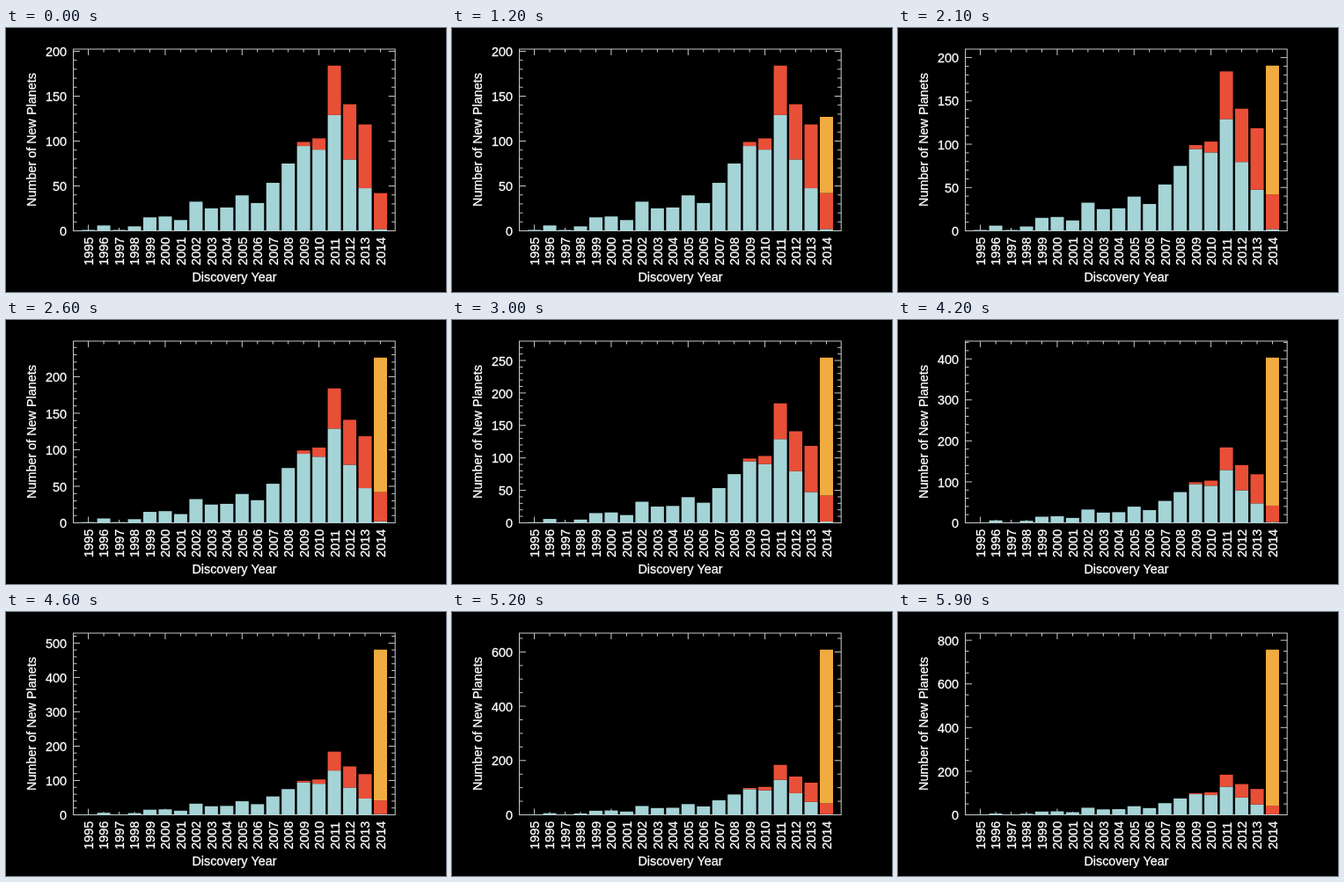
Write an HTML page with a canvas that moves like this. It is 500 px wide and 300 px high and loops after 8400 ms.

```html
<!DOCTYPE html>
<html lang="en">
<head>
<meta charset="utf-8">
<title>New planets per year</title>
<style>
html, body { margin: 0; width: 100%; height: 100%; overflow: hidden; background: #000; }
canvas { display: block; }
</style>
</head>
<body>
<canvas id="chart" width="500" height="300"></canvas>
<script>
const ctx = document.getElementById('chart').getContext('2d');
const LOOP = 8400, STEP = 100, LAST = 59;
const L = 76.5, R = 442.2, T = 24, B = 230.5;
const FIRST_YEAR = 1995, FIRST_X = 93.6, PITCH = 17.47, BAR = 15;
const BLUE = '#a5d4d6', RED = '#e94f37', ORANGE = '#f0ab41', LINE = '#c8c8c8';

const base = [1, 6, 1, 5, 15, 16, 12, 32.5, 25, 26, 39.5, 31, 53.5, 75,
  94.5, 90.5, 129, 79.5, 47.5, 2];
const extra = { 2009: 4.5, 2010: 12.5, 2011: 55, 2012: 61.5, 2013: 71, 2014: 40 };
const PEAK = 184, START = 42, RATE = 7.08;

// The count runs at single, then double, then triple speed.
const added = n => RATE * (n + Math.max(0, n - 33) + Math.max(0, n - 43));

const yearX = i => FIRST_X + i * PITCH;

function line(x1, y1, x2, y2) {
  ctx.beginPath();
  ctx.moveTo(x1, y1);
  ctx.lineTo(x2, y2);
  ctx.stroke();
}

function label(str, x, y, align, turned) {
  ctx.save();
  ctx.translate(x, y);
  if (turned) ctx.rotate(-Math.PI / 2);
  ctx.textAlign = align;
  ctx.strokeStyle = '#fff';
  ctx.lineWidth = 0.3;
  ctx.fillText(str, 0, 0);
  ctx.strokeText(str, 0, 0);
  ctx.restore();
}

function drawAxes(max, toY) {
  const major = max > 600 ? 200 : max > 300 ? 100 : 50;
  const parts = major === 200 ? 4 : 5;
  ctx.strokeStyle = LINE;
  ctx.fillStyle = '#fff';
  ctx.lineWidth = 1;
  ctx.strokeRect(L, T, R - L, B - T);

  for (let k = 0; k * major / parts <= max; k++) {
    const v = k * major / parts, y = toY(v);
    const big = k % parts === 0, len = big ? 7.5 : 4;
    line(L, y, L + len, y);
    line(R, y, R - len, y);
    if (big) label(v, 69, y + 5.6, 'right');
  }
  base.forEach((_, i) => {
    const x = yearX(i), len = i % 5 ? 3.5 : 7;
    line(x, T, x, T + len);
    line(x, B, x, B - len);
    label(FIRST_YEAR + i, x + 5.4, 269.8, 'left', true);
  });
  label('Discovery Year', 259.5, 288, 'center');
  label('Number of New Planets', 34, 127, 'center', true);
}

function drawBars(toY, gain) {
  base.forEach((low, i) => {
    const year = FIRST_YEAR + i, x = yearX(i) - BAR / 2;
    let from = 0;
    const stack = (v, color) => {
      if (!v) return;
      const y = toY(from + v);
      ctx.fillStyle = color;
      ctx.fillRect(x, y, BAR, toY(from) - y);
      from += v;
    };
    stack(low, BLUE);
    stack(extra[year], RED);
    if (year === 2014) stack(gain, ORANGE);
  });
}

function draw(ms) {
  const n = Math.min(LAST, Math.floor(ms % LOOP / STEP));
  const gain = added(n);
  const max = 1.1 * Math.max(PEAK, START + gain);
  const toY = v => B - v / max * (B - T);
  ctx.fillStyle = '#000';
  ctx.fillRect(0, 0, 500, 300);
  ctx.font = '14.4px "Liberation Sans", Arial, sans-serif';
  drawAxes(max, toY);
  drawBars(toY, gain);
}

let begin = null;
function tick(now) {
  if (begin === null) begin = now;
  draw(Math.max(0, now - begin));
  requestAnimationFrame(tick);
}
draw(0);
requestAnimationFrame(tick);
</script>
</body>
</html>
```
